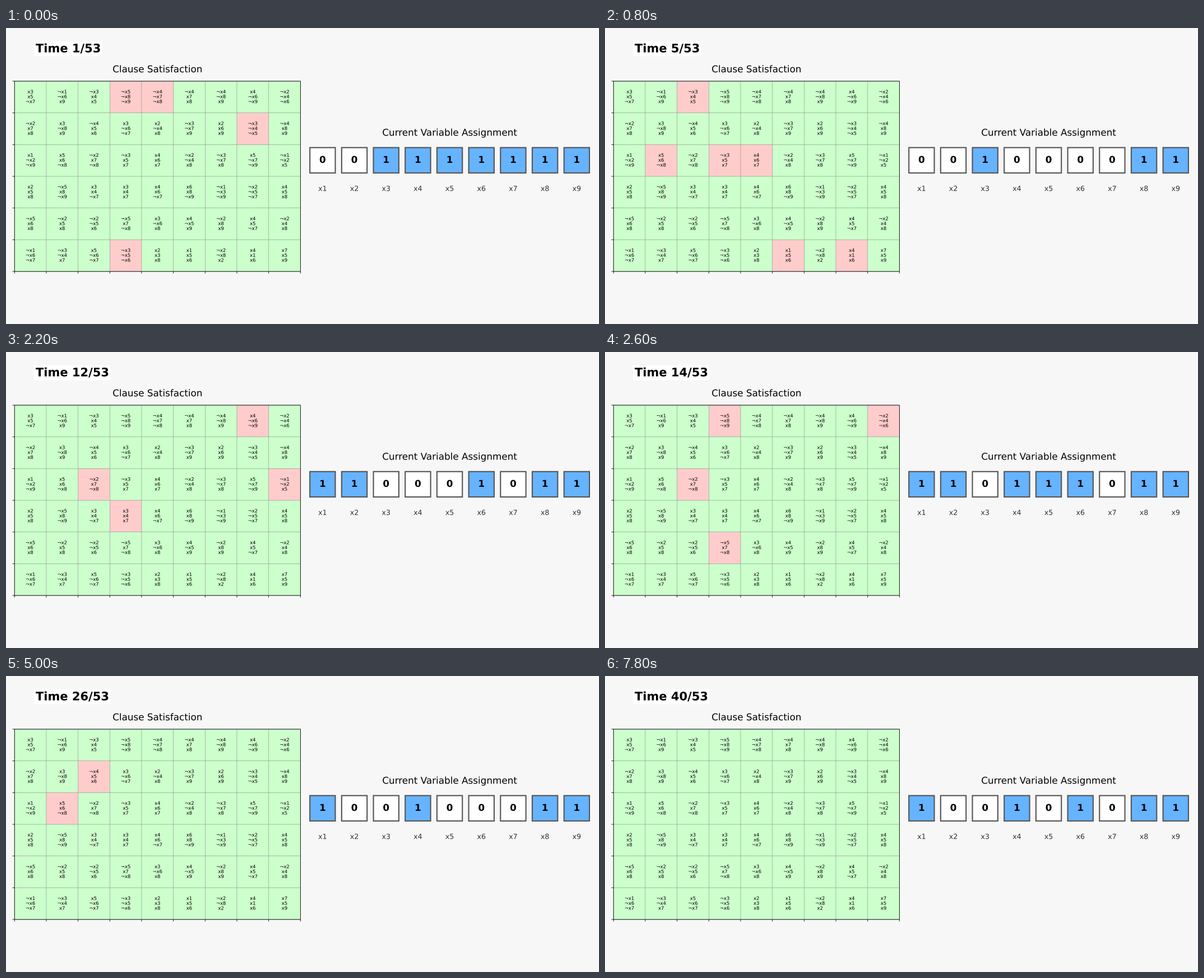
Write a matplotlib script that moves like this. It is 1058 px wide and 529 px high and loops after 8000 ms.

```python
import matplotlib.pyplot as plt
from matplotlib.animation import FuncAnimation
from matplotlib.patches import PathPatch, Rectangle
from matplotlib.path import Path
from matplotlib.text import Text
from matplotlib.textpath import TextPath, text_to_path

WIDTH, HEIGHT = 1058, 529
DPI = HEIGHT / 7
PT = DPI / 72  # pixels per point

FRAMES, INTERVAL, TOTAL_STEPS = 40, 200, 53

CLAUSE_ROWS = """
x3 x5 ¬x7, ¬x1 ¬x6 x9, ¬x3 x4 x5, ¬x5 ¬x8 ¬x9, ¬x4 ¬x7 ¬x8, ¬x4 x7 x8, ¬x4 ¬x8 x9, x4 ¬x6 ¬x9, ¬x2 ¬x4 ¬x6
¬x2 x7 x8, x3 ¬x8 x9, ¬x4 x5 x6, x3 ¬x6 ¬x7, x2 ¬x4 x8, ¬x3 ¬x7 x9, x2 x6 x9, ¬x3 ¬x4 ¬x5, ¬x4 x8 x9
x1 ¬x2 ¬x9, x5 x6 ¬x8, ¬x2 x7 ¬x8, ¬x3 x5 x7, x4 x6 x7, ¬x2 ¬x4 x8, ¬x3 ¬x7 x8, x5 ¬x7 ¬x9, ¬x1 ¬x2 x5
x2 x5 x8, ¬x5 x8 ¬x9, x3 x4 ¬x7, x3 x4 x7, x4 x6 ¬x7, x6 x8 ¬x9, ¬x1 ¬x3 ¬x9, ¬x2 ¬x5 ¬x7, x4 x5 x8
¬x5 x6 x8, ¬x2 x5 x8, ¬x2 ¬x5 x6, ¬x5 x7 ¬x8, x3 ¬x6 x8, x4 ¬x5 x9, ¬x2 x8 x9, x4 x5 ¬x7, ¬x2 x4 x8
¬x1 ¬x6 ¬x7, ¬x3 ¬x4 x7, x5 ¬x6 ¬x7, ¬x3 ¬x5 ¬x6, x2 x3 x8, x1 x5 x6, ¬x2 ¬x8 x2, x4 x1 x6, x7 x5 x9
"""
CLAUSES = [[clause.split() for clause in row.split(",")]
           for row in CLAUSE_ROWS.strip().splitlines()]
ROWS, COLS = len(CLAUSES), len(CLAUSES[0])

# The search sweeps the variables from last to first; these steps flip theirs.
START = [0, 0, 1, 1, 1, 1, 1, 1, 1]
FLIP_STEPS = {2, 3, 4, 5, 6, 7, 8, 12, 13, 14, 16, 17, 21, 22, 26, 30}

CELL = 56.68
LEFT, TOP = 15.2, 95.0
RIGHT, BOTTOM = LEFT + COLS * CELL, TOP + ROWS * CELL
VARS_LEFT, VARS_Y = 536.5, 236.4
SIDE = 0.8 * CELL

BACKGROUND = "#f7f7f7"
GREEN, RED, BLUE = "#ccffcc", "#ffcccc", "#66b3ff"


def text_shape(x, y, text, points, weight="normal", centered=True):
    """Outline of a text whose baseline lies at y."""
    font = Text(family="DejaVu Sans", weight=weight,
                size=points * PT).get_fontproperties()
    if centered:
        x -= text_to_path.get_text_width_height_descent(text, font, False)[0] / 2
    outline = TextPath((0, 0), text, prop=font)
    return Path(outline.vertices * [1, -1] + [x, y], outline.codes)


def add_shape(path, color="black"):
    return ax.add_patch(PathPatch(path, fc=color, lw=0, zorder=5, snap=False))


def add_rect(x, y, w, h, color, **style):
    style = {"lw": 0, "snap": False, **style}
    return ax.add_patch(Rectangle((x, y), w, h, fc=color, **style))


def add_line(x0, y0, x1, y1, color, width, zorder):
    ax.plot([x0, x1], [y0, y1], color=color, lw=width, zorder=zorder,
            snap=False, solid_capstyle="butt")


def draw_grid():
    tick = 3.5 * PT
    for i in range(COLS + 1):
        x = LEFT + i * CELL
        add_line(x, TOP, x, BOTTOM, "gray", 0.5, 3)
        add_line(x, BOTTOM, x, BOTTOM + tick, "black", 0.8, 4)
    for i in range(ROWS + 1):
        y = TOP + i * CELL
        add_line(LEFT, y, RIGHT, y, "gray", 0.5, 3)
        add_line(LEFT - tick, y, LEFT, y, "black", 0.8, 4)
    add_rect(LEFT, TOP, RIGHT - LEFT, BOTTOM - TOP, "none",
             ec="black", lw=0.8, zorder=4)


def assignment(step):
    bits = list(START)
    for s in FLIP_STEPS:
        if s <= step:
            bits[(8 - s) % 9] ^= 1
    return bits


def satisfied(clause, bits):
    return any(bits[int(lit[-1]) - 1] != lit.startswith("¬") for lit in clause)


fig = plt.figure(figsize=(14, 7), dpi=DPI, facecolor=BACKGROUND)
ax = fig.add_axes([0, 0, 1, 1])
ax.set(xlim=(0, WIDTH), ylim=(HEIGHT, 0), autoscale_on=False)
ax.axis("off")

add_shape(text_shape((LEFT + RIGHT) / 2, 79.2, "Clause Satisfaction", 16))
add_shape(text_shape(VARS_LEFT + 4.5 * CELL, 192.5,
                     "Current Variable Assignment", 16))

add_rect(LEFT, TOP, RIGHT - LEFT, BOTTOM - TOP, GREEN, zorder=1)
violations = []
for row, clauses in enumerate(CLAUSES):
    for col, clause in enumerate(clauses):
        x, y = LEFT + col * CELL, TOP + row * CELL
        violations.append((clause, add_rect(x, y, CELL, CELL, RED, zorder=2)))
        for k, literal in enumerate(clause):
            baseline = y + CELL / 2 + 2.2 + (k - 1) * 8.75
            add_shape(text_shape(x + CELL / 2, baseline, literal, 8))
draw_grid()

variables = []
for i in range(len(START)):
    x = VARS_LEFT + (i + 0.5) * CELL
    box = add_rect(x - SIDE / 2, VARS_Y - SIDE / 2, SIDE, SIDE, "white",
                   ec="#555555", lw=2, zorder=2)
    digits = [text_shape(x, VARS_Y + 4.6, d, 16, "bold") for d in "01"]
    variables.append((box, add_shape(digits[0]), digits))
    add_shape(text_shape(x, 291.2, f"x{i + 1}", 12), "#333333")

TIME_X = 0.05 * WIDTH
time_box = add_rect(TIME_X - 3.1, 23.6, 0, 26.9, "white", zorder=2)
time_label = add_shape(Path([(0, 0)]))


def update(frame):
    step = frame + 1
    bits = assignment(step)

    label = text_shape(TIME_X, 43.5, f"Time {step}/{TOTAL_STEPS}", 20,
                       "bold", centered=False)
    time_label.set_path(label)
    time_box.set_width(label.vertices[:, 0].max() + 3.8 - time_box.get_x())

    for clause, cell in violations:
        cell.set_visible(not satisfied(clause, bits))
    for bit, (box, digit, shapes) in zip(bits, variables):
        box.set_facecolor(BLUE if bit else "white")
        digit.set_path(shapes[bit])


anim = FuncAnimation(fig, update, frames=FRAMES, interval=INTERVAL,
                     init_func=lambda: update(0), repeat=True, repeat_delay=0)
plt.show()
```
